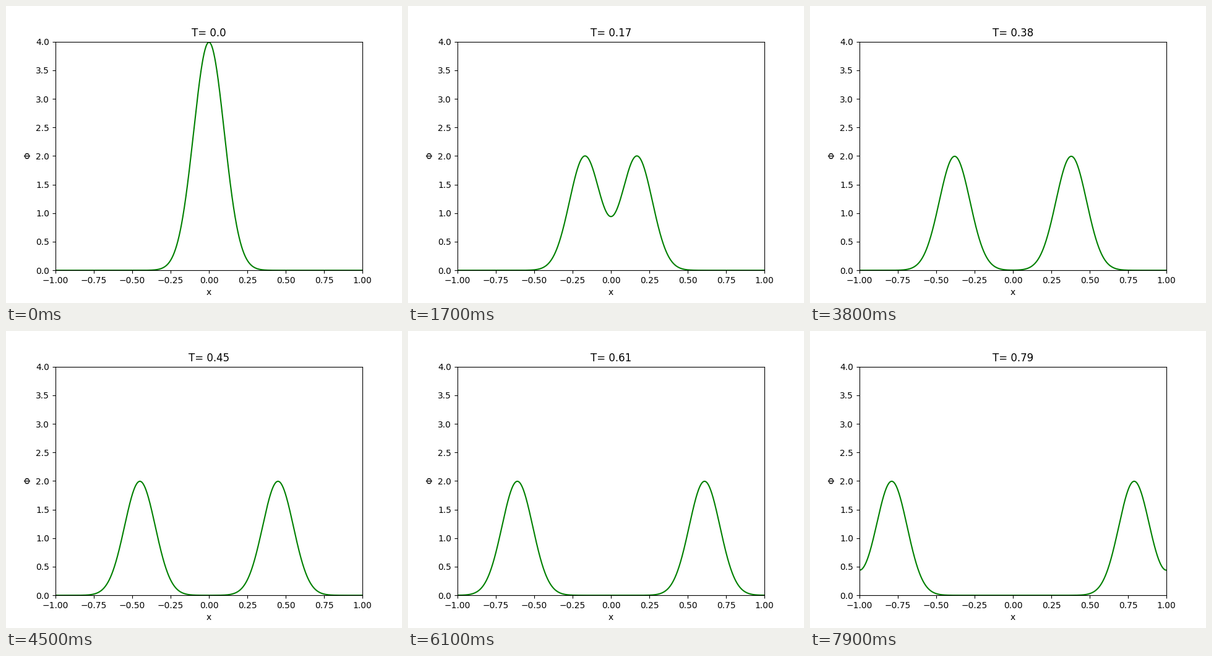
These frames come from a looping animation (640 px wide and 480 px high, 8 s). A matplotlib script:

```python
import numpy as np
import matplotlib.pyplot as plt
from matplotlib.animation import FuncAnimation

FRAMES = 80
STEP_MS = 100
DT = 0.01
SIGMA = 0.1

x = np.linspace(-1, 1, 1001)


def pulse(center):
    norm = SIGMA * np.sqrt(2 * np.pi)
    return np.exp(-0.5 * ((x - center) / SIGMA) ** 2) / norm


def wave(t):
    """d'Alembert solution on a periodic domain of length 2."""
    return 0.5 * sum(pulse(s * t + 2 * k) for s in (-1, 1) for k in (-1, 0, 1))


fig, ax = plt.subplots(figsize=(6.4, 4.8), dpi=100)
ax.set_xlim(-1, 1)
ax.set_ylim(0, 4)
ax.set_xlabel("x")
ax.set_ylabel(r"$\Phi$")
title = ax.set_title("T= 0.0")
line, = ax.plot(x, wave(0), color="green")


def update(i):
    t = round(i * DT, 2)
    line.set_ydata(wave(t))
    title.set_text(f"T= {t}")
    return line, title


anim = FuncAnimation(fig, update, frames=FRAMES, interval=STEP_MS,
                     repeat=True, repeat_delay=0, blit=False)
plt.show()
```
